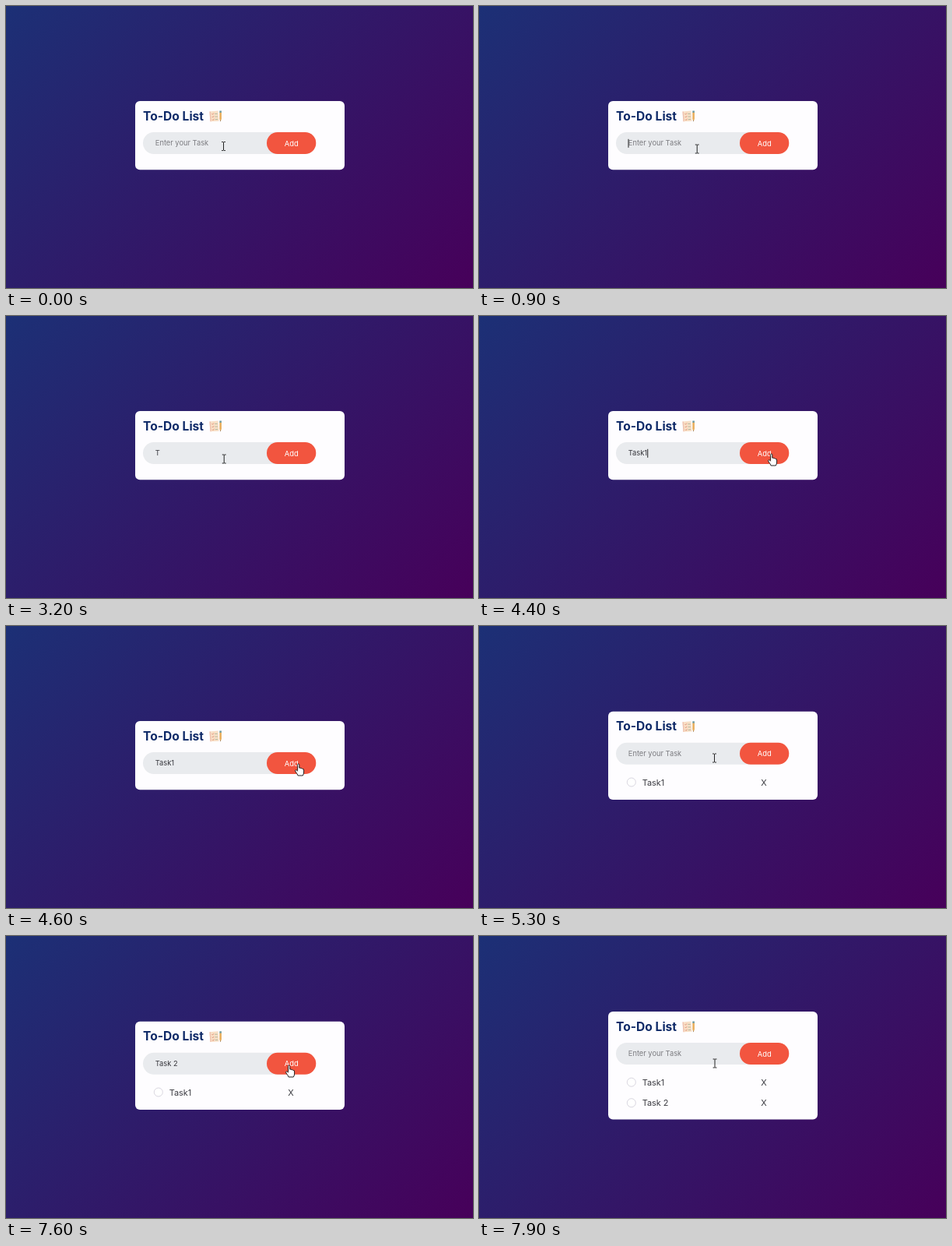
These frames come from a looping animation (600x362 px, 8000 ms). An HTML page:

```html
<!DOCTYPE html>
<html lang="en">
<head>
<meta charset="utf-8">
<title>To-Do List</title>
<style>
  html, body { margin: 0; width: 100%; height: 100%; overflow: hidden; }
  body { background: linear-gradient(135deg, #1c3076, #47005a); }
  svg { display: block; width: 600px; height: 362px; font-family: Inter, "Open Sans", sans-serif; }
  text { white-space: pre; }
  .title { font-size: 15.6px; font-weight: 700; fill: #0f2a68; }
  .field { font-size: 9.3px; fill: #36363c; }
  .field.empty { fill: #7c7c80; }
  .add { font-size: 9.4px; fill: #fff; text-anchor: middle; }
  .item { font-size: 10.9px; fill: #3a3a40; }
  .item circle { fill: #fff; stroke: #d9d6e0; }
  .item .x { text-anchor: middle; }
</style>
</head>
<body>
<svg viewBox="0 0 600 362">
  <rect id="card" x="166" width="269" rx="6" fill="#fefdff"/>
  <!-- coordinates inside the panel are relative to the card's top edge -->
  <g id="panel">
    <text class="title" x="176" y="24.7">To-Do List</text>
    <g id="icon">
      <path d="M261.5 13.5l11-1 1 13.2-11 .6z" fill="#f8dfc6"/>
      <path d="M261.5 13.5l1.3 0 .8 12.7-1.2.1z" fill="#eebfae"/>
      <path d="M264.5 16.3l1 1 1.4-1.8M264.7 20l1 1 1.4-1.8M265 23.6l1 1 1.4-1.8" fill="none" stroke="#d9806b" stroke-width=".8"/>
      <path d="M268.3 16.4h3.4M268.5 20h3.4M268.7 23.6h3.4" stroke="#a9b59a" stroke-width=".9"/>
      <path d="M274.3 14.5h2.6v8.5l-1.3 3.2-1.3-3.2z" fill="#e9ae5c"/>
      <path d="M274.3 12.5h2.6v2.4h-2.6z" fill="#6d9aa0"/>
      <path d="M275.2 24.8h.9l-.5 1.6z" fill="#59483c"/>
    </g>
    <rect x="176" y="40" width="205" height="28" rx="14" fill="#e9ebee"/>
    <rect x="335" y="40" width="63.3" height="28" rx="14" fill="#f2553f"/>
    <text class="add" x="366.7" y="57.6">Add</text>
    <text id="field" class="field" x="191.8" y="57.4"></text>
    <rect id="caret" y="48.8" width="1" height="11" fill="#222"/>
    <g id="items"></g>
  </g>
  <g id="beam" fill="none">
    <path id="bar" d="M-2.4 -5.5H-.7L0 -5L.7 -5.5H2.4M0 -5V5M-2.4 5.5H-.7L0 5L.7 5.5H2.4" stroke="#222" stroke-width="1"/>
  </g>
  <path id="hand" fill="#fff" stroke="#222" stroke-width="1" stroke-linejoin="round"
    d="M-2.4 1.6V-5.8Q-2.4 -7 -1.3 -7T-.2 -5.8V-1.8Q1.4 -2.6 1.9 -1.2Q3.4 -1.9 3.9 -.5Q5.6 -.9 5.6 1V4Q5.6 6 4.3 8H-1.9Q-2.6 6 -5 3Q-6 1.4 -4.8 .8T-2.4 2.4"/>
</svg>
<script>
const LOOP = 8000, STEP = 100, BLINK = 265;
const $ = id => document.getElementById(id);
const hint = "Enter your Task";

// time, field text; each entry also restarts the caret's blink
const keys = [
  [275, ""], [2900, "T"], [3250, "Ta"], [3380, "Tas"], [3480, "Task"], [3620, "Task1"],
  [5320, ""], [5630, "T"], [5960, "Ta"], [6080, "Tas"], [6220, "Task"], [6560, "Task "], [6720, "Task 2"]
];
const adds = [[4750, "Task1"], [7720, "Task 2"]];
const cardBox = [[122, 88.3], [109.8, 113.2], [97, 138.4]];

// time, x, y of the pointer
const path = [
  [0, 279.5, 180], [100, 279.5, 180], [500, 280.2, 183.5], [4000, 280.2, 183.5],
  [4400, 377, 184], [4900, 377, 184], [5100, 302.5, 169.5], [6700, 302.5, 169.5],
  [7200, 376.5, 170.5], [7500, 365, 173], [7700, 365, 173], [7900, 303, 163.5]
];

function pointerAt(t) {
  const i = path.findIndex(p => p[0] > t);
  if (i < 0) return path[path.length - 1].slice(1);
  const [t0, x0, y0] = path[i - 1], [t1, x1, y1] = path[i];
  const k = (t - t0) / (t1 - t0);
  return [x0 + (x1 - x0) * k, y0 + (y1 - y0) * k];
}

const rows = adds.map(([, name], i) => {
  const y = 91 + i * 26.5;
  $("items").insertAdjacentHTML("beforeend",
    `<g class="item"><circle cx="195.8" cy="${y - .3}" r="5.5"/>
     <text x="209.7" y="${y + 3.8}">${name}</text><text class="x" x="366" y="${y + 3.8}">X</text></g>`);
  return $("items").lastChild;
});

function draw(t) {
  const count = adds.filter(a => a[0] <= t).length;
  const [top, height] = cardBox[count];
  $("card").setAttribute("y", top);
  $("card").setAttribute("height", height);
  $("panel").setAttribute("transform", `translate(0 ${top})`);
  rows.forEach((row, i) => row.style.display = i < count ? "" : "none");

  const key = keys.filter(k => k[0] <= t).pop();
  const lastAdd = count ? adds[count - 1][0] : 0;
  const focused = key && key[0] > lastAdd;
  const typed = focused ? key[1] : "";
  const field = $("field");
  field.textContent = typed || hint;
  field.classList.toggle("empty", !typed);

  const lit = focused && Math.floor((t - key[0]) / BLINK) % 2 === 0;
  $("caret").style.display = lit ? "" : "none";
  $("caret").setAttribute("x", 191.5 + (typed ? field.getComputedTextLength() + .4 : 0));

  const [x, y] = pointerAt(t);
  const overButton = x > 335;
  $("beam").style.display = overButton ? "none" : "";
  $("hand").style.display = overButton ? "" : "none";
  $(overButton ? "hand" : "beam").setAttribute("transform", `translate(${x} ${y})`);
}

const start = performance.now();
function tick() {
  draw(Math.floor((performance.now() - start) % LOOP / STEP) * STEP);
  requestAnimationFrame(tick);
}
tick();
</script>
</body>
</html>
```
